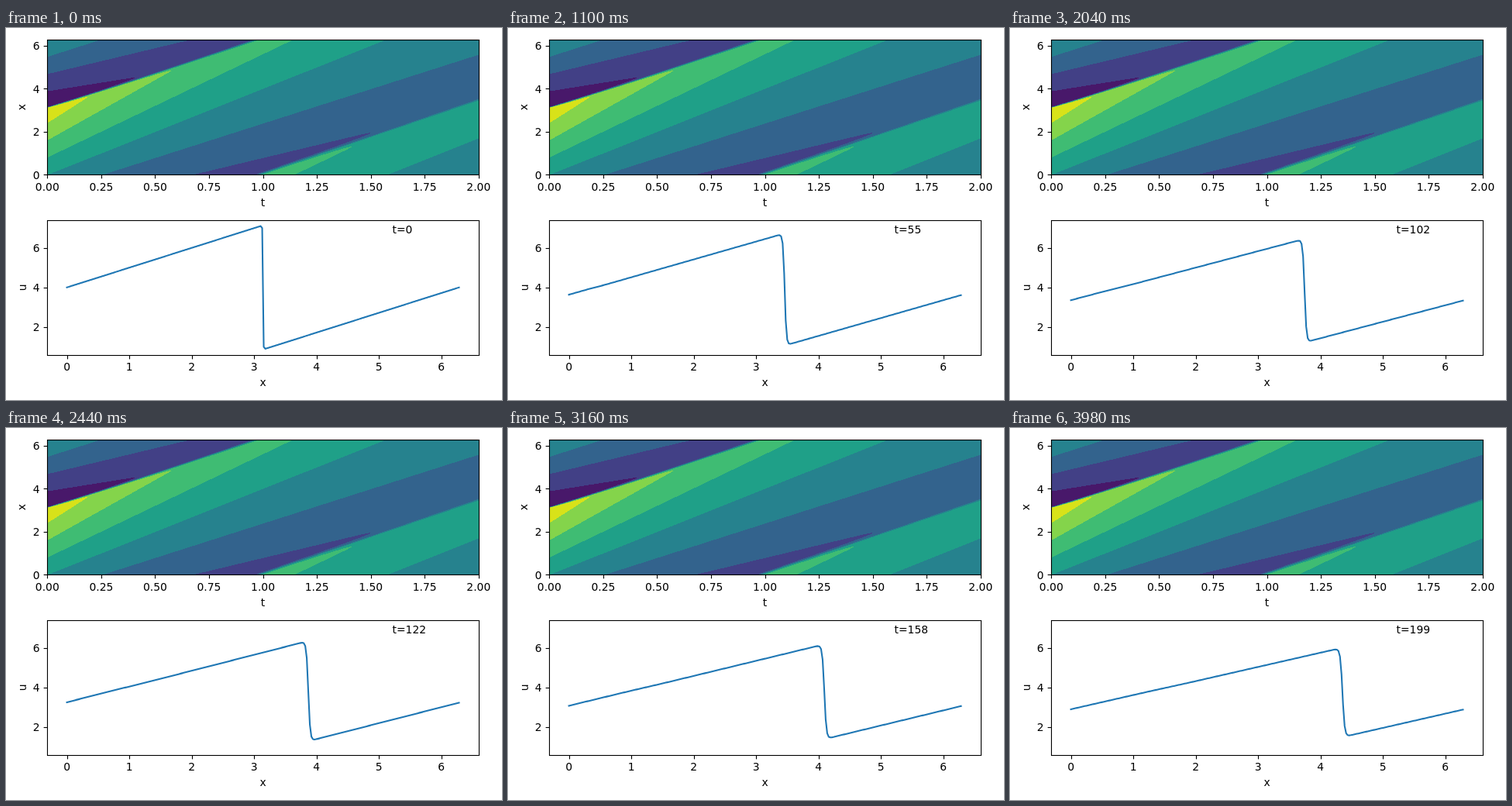
These frames come from a looping animation (640x480 px, 4 s). An HTML page with a canvas:

```html
<!DOCTYPE html>
<html lang="en">
<head>
<meta charset="utf-8">
<title>Viscous Burgers equation</title>
<style>
  html, body { margin: 0; width: 100%; height: 100%; overflow: hidden; background: #fff; }
  canvas { display: block; }
</style>
</head>
<body>
<canvas id="stage" width="640" height="480"></canvas>
<script>
const NX = 256, NT = 1024, NU = 0.01, T_MAX = 2, X_MAX = 2 * Math.PI;
const DX = X_MAX / (NX - 1), DT = T_MAX / (NT - 1);
const FRAMES = 200, FRAME_MS = 20;
const BANDS = ['48186a', '424086', '33638d', '26828e', '1fa088', '3fbc73', '84d44b', 'd8e219'];
const LEVEL_STEP = 0.8;
const LEFT = 53.3, RIGHT = 609.8;
const MAP = { top: 15.1, bottom: 189.4 };
const PLOT = { top: 247.6, bottom: 421.9 };

const stage = document.getElementById('stage').getContext('2d');
const backdrop = document.createElement('canvas');
backdrop.width = 640;
backdrop.height = 480;

// Sawtooth start, then upwind advection with central diffusion on a wrapped grid.
function solve() {
  const first = Float64Array.from({ length: NX }, (_, i) => {
    const x = i * DX;
    return 4 + x - X_MAX / (1 + Math.exp(-Math.PI * (x - Math.PI) / NU));
  });
  const rows = [first];
  for (let n = 1; n < NT; n++) {
    const u = rows[n - 1];
    rows.push(u.map((c, i) => {
      const l = u[(i + NX - 1) % NX], r = u[(i + 1) % NX];
      return c - c * DT / DX * (c - l) + NU * DT / (DX * DX) * (r - 2 * c + l);
    }));
  }
  return rows;
}

const rows = solve();
const uMin = Math.min(...rows[0]), uMax = Math.max(...rows[0]);
const mix = (a, b, k) => a + (b - a) * k;
const clamp = (v, lo, hi) => Math.max(lo, Math.min(hi, v));

const mapX = t => mix(LEFT, RIGHT, t / T_MAX);
const mapY = x => mix(MAP.bottom, MAP.top, x / X_MAX);
const plotX = x => mix(LEFT, RIGHT, (x / X_MAX + 0.05) / 1.1);
const plotY = u => mix(PLOT.bottom, PLOT.top, ((u - uMin) / (uMax - uMin) + 0.05) / 1.1);

function sample(n, i) {
  const n0 = Math.min(Math.floor(n), NT - 2), i0 = Math.min(Math.floor(i), NX - 2);
  const a = rows[n0], b = rows[n0 + 1];
  return mix(mix(a[i0], a[i0 + 1], i - i0), mix(b[i0], b[i0 + 1], i - i0), n - n0);
}

function drawBands(g) {
  const x0 = 53, y0 = 15, w = 557, h = 175;
  const image = g.createImageData(w, h);
  const rgb = BANDS.map(c => [0, 2, 4].map(k => parseInt(c.slice(k, k + 2), 16)));
  for (let y = 0; y < h; y++) {
    const i = clamp((MAP.bottom - y0 - y - 0.5) / (MAP.bottom - MAP.top), 0, 1) * (NX - 1);
    for (let x = 0; x < w; x++) {
      const n = clamp((x0 + x + 0.5 - LEFT) / (RIGHT - LEFT), 0, 1) * (NT - 1);
      const band = clamp(Math.floor(sample(n, i) / LEVEL_STEP + 1e-9) - 1, 0, 7);
      image.data.set([...rgb[band], 255], 4 * (y * w + x));
    }
  }
  g.putImageData(image, x0, y0);
}

function setText(g, align) {
  g.font = '13.89px "DejaVu Sans", sans-serif';
  g.fillStyle = '#000';
  g.textAlign = align;
}

const snap = v => Math.floor(v + 0.5) + 0.5;

function line(g, xa, ya, xb, yb) {
  g.beginPath();
  g.moveTo(xa, ya);
  g.lineTo(xb, yb);
  g.stroke();
}

function drawAxes(g, box, xTicks, yTicks, toX, toY, xLabel, yLabel, yLabelX) {
  const left = snap(LEFT), right = snap(RIGHT), top = snap(box.top), bottom = snap(box.bottom);
  g.strokeStyle = '#000';
  g.lineWidth = 1.11;
  g.strokeRect(left, top, right - left, bottom - top);
  setText(g, 'center');
  for (const text of xTicks) {
    const x = toX(+text);
    line(g, snap(x), bottom, snap(x), bottom + 4.86);
    g.fillText(text, x, Math.round(box.bottom + 20.2));
  }
  g.fillText(xLabel, (LEFT + RIGHT) / 2, Math.round(box.bottom + 40.4));
  setText(g, 'right');
  for (const text of yTicks) {
    const y = toY(+text);
    line(g, left - 4.86, snap(y), left, snap(y));
    g.fillText(text, 43.6, Math.round(y + 5.2));
  }
  g.save();
  g.translate(yLabelX, (box.top + box.bottom) / 2);
  g.rotate(-Math.PI / 2);
  setText(g, 'center');
  g.fillText(yLabel, 0, 0);
  g.restore();
}

function drawBackdrop() {
  const g = backdrop.getContext('2d');
  g.fillStyle = '#fff';
  g.fillRect(0, 0, 640, 480);
  drawBands(g);
  const times = Array.from({ length: 9 }, (_, k) => (k / 4).toFixed(2));
  drawAxes(g, MAP, times, ['0', '2', '4', '6'], mapX, mapY, 't', 'x', 25);
  drawAxes(g, PLOT, ['0', '1', '2', '3', '4', '5', '6'], ['2', '4', '6'], plotX, plotY, 'x', 'u', 26);
}

function draw(n) {
  stage.drawImage(backdrop, 0, 0);
  stage.strokeStyle = '#1f77b4';
  stage.lineWidth = 2.083;
  stage.lineJoin = 'round';
  stage.lineCap = 'square';
  stage.beginPath();
  rows[n].forEach((u, i) => stage.lineTo(plotX(i * DX), plotY(u)));
  stage.stroke();
  setText(stage, 'left');
  stage.fillText('t=' + n, mix(LEFT, RIGHT, 0.8), 265);
}

drawBackdrop();
const start = performance.now();
function tick() {
  draw(Math.floor((performance.now() - start) / FRAME_MS) % FRAMES);
  requestAnimationFrame(tick);
}
tick();
</script>
</body>
</html>
```
